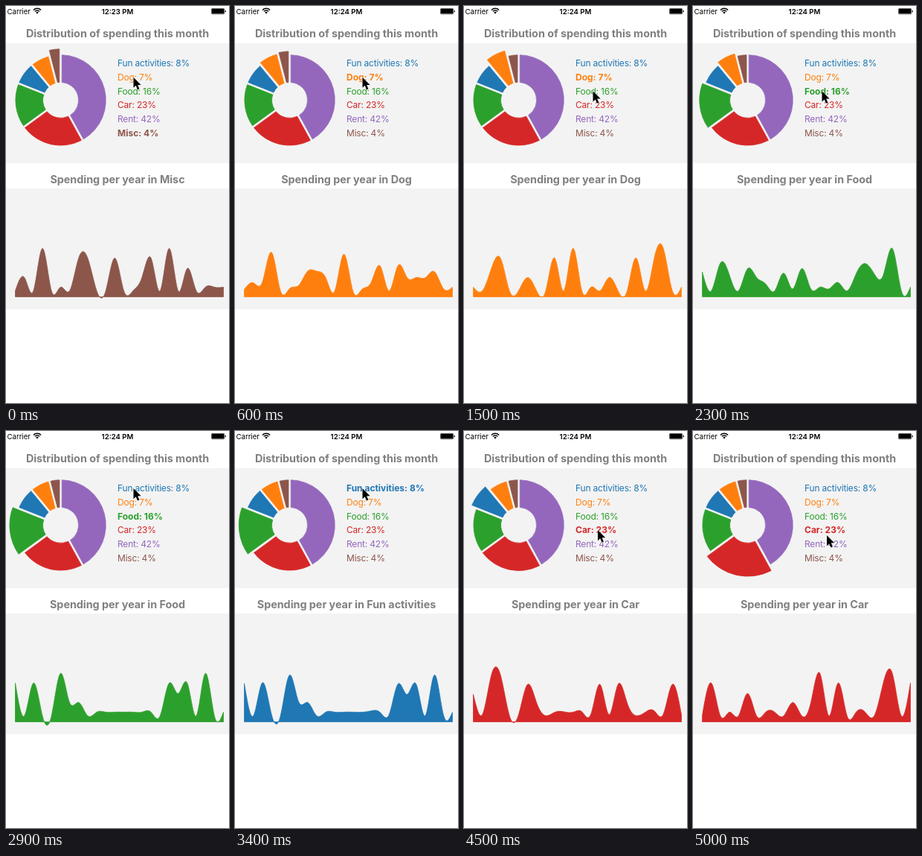
These frames come from a looping animation (300x533 px, 5.1 s). An HTML page:

```html
<!DOCTYPE html>
<html lang="en">
<head>
<meta charset="utf-8">
<title>Spending</title>
<style>
  html, body { margin: 0; height: 100%; overflow: hidden; background: #fff; }
  svg { display: block; width: 100vw; height: 100vh; font: 12px Inter, sans-serif; }
  .title { font-size: 14.4px; font-weight: 700; letter-spacing: -.003em; fill: #808080; text-anchor: middle; }
  .label { letter-spacing: -.016em; }
  .label.picked { font-weight: 700; letter-spacing: 0; }
  .status { font-size: 9.6px; }
  .clock { font-weight: 600; text-anchor: middle; }
</style>
</head>
<body>
<svg viewBox="0 0 300 533">
  <path fill="#f3f3f3" d="M0 50H300V211H0zM0 245H300V407H0z"/>
  <text class="status" x="1.5" y="10.8">Carrier</text>
  <g fill="none" stroke="#000" stroke-width="1.4">
    <path d="M36.9 5.4a7.2 7.2 0 0 1 10.2 0M38.8 7.3a4.5 4.5 0 0 1 6.4 0"/>
    <path d="M42 10.5l-1.8-1.8a2.5 2.5 0 0 1 3.6 0z" fill="#000" stroke="none"/>
  </g>
  <text class="status clock" id="clock" x="150" y="10.8"></text>
  <rect x="276.4" y="3.4" width="17.4" height="7.4" rx="1.4" fill="none" stroke="#000" stroke-width=".7"/>
  <path d="M277.1 4.1h16v6h-16zM294.6 5.7q1.4 .3 1.4 1.4t-1.4 1.4z"/>
  <text class="title" x="150" y="42">Distribution of spending this month</text>
  <text class="title" id="heading" x="150" y="237.5"></text>
  <g id="pie" transform="translate(73.6 126.4)"></g>
  <g id="legend"></g>
  <path id="area" stroke-width=".8"/>
  <path id="cursor" d="M0 0V14.2L3.2 11.2 5.5 16.5 7.9 15.5 5.7 10.3H10.2z" stroke="#fff" stroke-width=".9" paint-order="stroke"/>
</svg>
<script>
const LOOP = 5100, FRAME = 100, MORPH = 250;
const INNER = 24, OUTER = 60.7, POP = 8, PAD = .05;
const MONTHS = 24, LEFT = 12.5, STEP = 280 / (MONTHS - 1), BASE = 390.4;

// Each category spends the same amounts in a different order: peaks lists its costliest months
const items = {
  'Fun activities': { share: 8, color: '#1f77b4', peaks: [3, 2, 16, 6, 14, 22, 0, 17, 7] },
  Dog: { share: 7, color: '#ff7f0e', peaks: [11, 21, 9, 20, 3, 18, 2, 15, 6] },
  Food: { share: 16, color: '#2ca02c', peaks: [5, 21, 0, 2, 17, 19, 18, 6, 7] },
  Car: { share: 23, color: '#d62728', peaks: [21, 13, 1, 15, 20, 23, 5, 12, 10] },
  Rent: { share: 42, color: '#9467bd', peaks: [] },
  Misc: { share: 4, color: '#8c564b', peaks: [3, 17, 7, 8, 11, 15, 19, 1, 14] }
};
const picks = [
  { at: -MORPH, name: 'Misc', x: 171.5 },
  { at: 500, name: 'Dog', x: 171.5 },
  { at: 2170, name: 'Food', x: 173.5 },
  { at: 3390, name: 'Fun activities', x: 171.5 },
  { at: 4490, name: 'Car', x: 180 }
];

const $ = id => document.getElementById(id);
const mix = (a, b, k) => a + (b - a) * k;
const clamp = k => Math.max(0, Math.min(1, k));
const smooth = k => clamp(k) ** 2 * (3 - 2 * clamp(k));

function add(parent, tag, attrs) {
  const el = document.createElementNS('http://www.w3.org/2000/svg', tag);
  for (const name in attrs) el.setAttribute(name, attrs[name]);
  return parent.appendChild(el);
}

// Peaks step down by rank; quiet months are lowest right beside a peak
function spending(peaks, month) {
  const rank = peaks.indexOf(month);
  if (rank < 0) return peaks.some(p => Math.abs(p - month) === 1) ? 8 : 13;
  return rank < 2 ? 65 : rank < 6 ? 52 : rank < 7 ? 38 : 26;
}

// Ring sector whose sides stay parallel to those of its neighbours
function sector(from, to, outer) {
  const gap = Math.hypot(INNER, outer) * Math.sin(PAD / 2);
  const point = (r, angle, side) => {
    const a = angle + side * Math.asin(gap / r);
    return `${r * Math.sin(a)} ${-r * Math.cos(a)}`;
  };
  return `M${point(outer, from, 1)}A${outer} ${outer} 0 0 1 ${point(outer, to, -1)}` +
    `L${point(INNER, to, -1)}A${INNER} ${INNER} 0 0 0 ${point(INNER, from, 1)}Z`;
}

// Area under a natural cubic spline
function areaPath(h) {
  const n = h.length - 1, c = [0], d = [0], m = [];
  for (let i = 1; i < n; i++) {
    c[i] = 1 / (4 - c[i - 1]);
    d[i] = (6 * (h[i - 1] - 2 * h[i] + h[i + 1]) - d[i - 1]) * c[i];
  }
  m[n] = 0;
  for (let i = n - 1; i >= 0; i--) m[i] = d[i] - c[i] * m[i + 1];
  const at = (i, y) => `${LEFT + i * STEP} ${BASE - y} `;
  let path = 'M' + at(0, 0) + 'L' + at(0, h[0]);
  for (let i = 0; i < n; i++) {
    const rise = h[i + 1] - h[i];
    path += 'C' + at(i + 1 / 3, h[i] + (rise - (2 * m[i] + m[i + 1]) / 6) / 3) +
      at(i + 2 / 3, h[i + 1] - (rise + (m[i] + 2 * m[i + 1]) / 6) / 3) + at(i + 1, h[i + 1]);
  }
  return path + 'L' + at(n, 0) + 'Z';
}

Object.entries(items).forEach(([name, item], i) => {
  item.y = 81.4 + 18.65 * i;
  item.data = Array.from({ length: MONTHS }, (_, month) => spending(item.peaks, month));
  item.label = add($('legend'), 'text', { x: 150, y: item.y, fill: item.color, class: 'label' });
  item.label.textContent = `${name}: ${item.share}%`;
  item.slice = add($('pie'), 'path', { fill: item.color, stroke: item.color, 'stroke-width': .8 });
});
let turn = 0;
for (const item of Object.values(items).sort((a, b) => b.share - a.share)) {
  item.from = turn;
  item.to = turn += item.share / 100 * 2 * Math.PI;
}

// The pointer glides to each label a while before picking it, and slips down at the end
function pointerAt(t) {
  let x = 0, y = 0;
  for (const pick of picks) {
    const k = smooth((t - pick.at + 1050) / 350);
    x = mix(x, pick.x, k);
    y = mix(y, items[pick.name].y - 4.4, k);
  }
  return [x, y + 7 * smooth((t - 4500) / 400)];
}

function draw(t) {
  const index = picks.filter(p => p.at <= t).length - 1;
  const { at, name } = picks[index];
  const now = items[name], before = items[picks[Math.max(0, index - 1)].name];
  const k = clamp((t - at) / MORPH);

  for (const item of Object.values(items)) {
    const out = item === now ? k : item === before ? 1 - k : 0;
    item.slice.setAttribute('d', sector(item.from, item.to, OUTER + POP * out));
    item.label.classList.toggle('picked', item === now);
  }
  $('area').setAttribute('d', areaPath(now.data.map((v, i) => mix(before.data[i], v, k))));
  $('area').setAttribute('fill', now.color);
  $('area').setAttribute('stroke', now.color);
  $('heading').textContent = 'Spending per year in ' + name;
  $('clock').textContent = index ? '12:24 PM' : '12:23 PM';
  $('cursor').setAttribute('transform', `translate(${pointerAt(t)})`);
}

const begin = performance.now();
function tick() {
  const t = (performance.now() - begin) % LOOP;
  draw(Math.floor(t / FRAME) * FRAME);
  requestAnimationFrame(tick);
}
tick();
</script>
</body>
</html>
```
